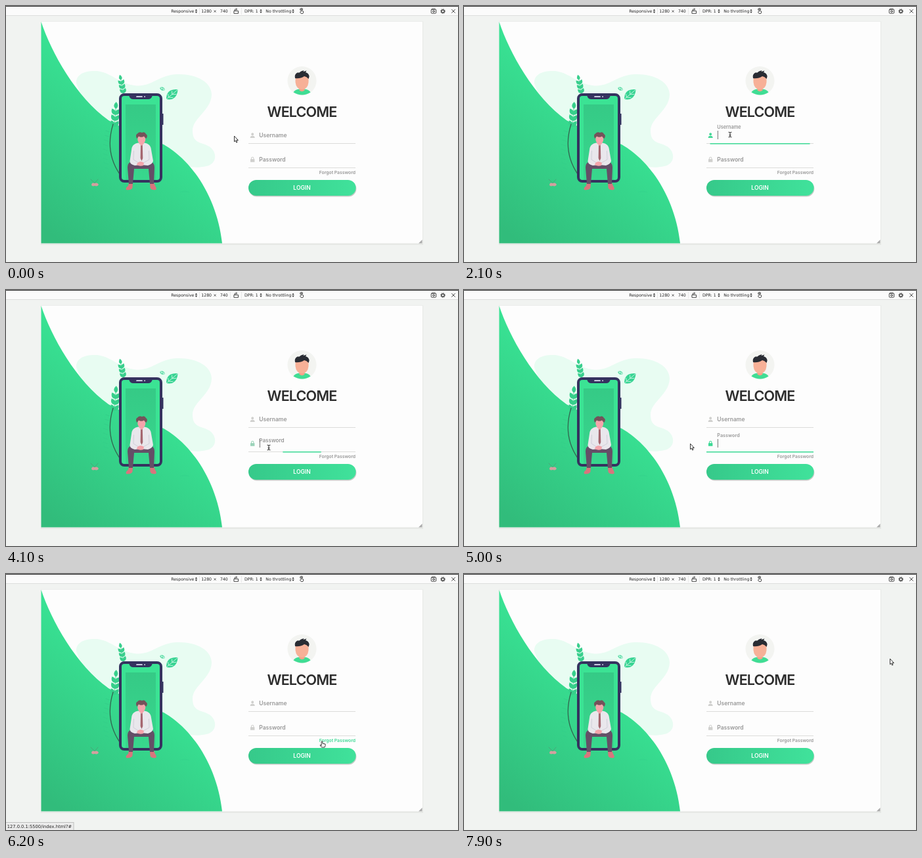
An HTML page for the animation above (8 s loop, 688x390 px).

```html
<!DOCTYPE html>
<html lang="en">
<head>
<meta charset="utf-8">
<title>Login form</title>
<style>
html, body { margin: 0; width: 688px; height: 390px; overflow: hidden; background: #f1f3f1; }
svg { display: block; }
text { font: 600 8.5px Inter, "Open Sans", sans-serif; }
.ui text { font: 6.2px "DejaVu Sans", Verdana, sans-serif; fill: #222; }
.line { fill: none; stroke-linecap: round; stroke-linejoin: round; }
</style>
</head>
<body>
<svg id="stage" width="688" height="390" viewBox="0 0 688 390">
  <defs>
    <linearGradient id="wave" x1=".62" y1=".22" x2=".12" y2="1">
      <stop stop-color="#3aeb99"/><stop offset="1" stop-color="#31bc7b"/>
    </linearGradient>
    <linearGradient id="btn" gradientUnits="userSpaceOnUse" x1="369" x2="697">
      <stop stop-color="#36c98a"/><stop offset=".5" stop-color="#40e29b"/><stop offset="1" stop-color="#36c98a"/>
    </linearGradient>
    <linearGradient id="screen" x2="0" y2="1">
      <stop stop-color="#35ca86"/><stop offset="1" stop-color="#38d78d"/>
    </linearGradient>
  </defs>

  <rect width="688" height="390" fill="#f1f3f1"/>
  <g class="ui">
    <rect width="688" height="14.5" fill="#fbfbfb"/>
    <rect width="688" height="1" fill="#333"/>
    <rect y="14" width="688" height="1" fill="#dddedd"/>
    <path d="M294.5 2V13M341.5 2V13M358.5 2V13" stroke="#e9e9e9"/>
    <text x="251.3" y="10.3">Responsive</text>
    <text x="297.3" y="10.3">1280</text>
    <text x="315.6" y="10.3">×</text>
    <text x="326" y="10.3">740</text>
    <text x="363" y="10.3">DPR: 1</text>
    <text x="395.3" y="10.3">No throttling</text>
    <path id="sorts" fill="#333"/>
    <g class="line" stroke="#333" stroke-width=".9">
      <path d="M347.3 7.5H353.5V11.3H347.3ZM348.4 7.3V5H351.5M350.6 4L351.7 5L350.6 6"/>
      <path d="M449 8.5V5Q449.7 4.2 450.3 5V7.2L452.6 8V10L451.8 11.5H449.2L447.4 9.2L448.2 8.6M447.7 6Q447 3.6 449.6 3.3Q452 3.4 451.6 5.5"/>
      <rect x="647.2" y="5" width="7.4" height="6.2" rx="1"/>
      <path d="M649 5V4.500H653V5"/>
      <circle cx="650.9" cy="8.100" r="1.400"/>
      <circle cx="665" cy="8" r="2.2" stroke-width="1.3"/>
      <circle cx="665" cy="8" r="3.4" stroke-dasharray="1.2 1.47" stroke-linecap="butt"/>
      <path d="M678.5 5.4L683.5 10.4M683.5 5.4L678.5 10.4"/>
    </g>
  </g>

  <rect x="53" y="23.5" width="582" height="340.5" fill="#e6e8e5"/>
  <rect x="53.5" y="24" width="580.5" height="337.5" fill="#fdfdfd"/>
  <path d="M628 361.5L633.5 356V361.5Z" fill="#aaa"/>
  <path fill="#e8fcf2" d="M107 118C106 104 120 98 138 99C160 101 172 118 195 121C220 125 232 105 260 104C290 103 313 116 313 135C312 160 284 170 284 190C284 212 300 206 312 216C322 225 320 241 305 244C280 250 256 240 235 225L120 150Z"/>
  <path fill="url(#wave)" d="M53.5 24C69 71 107 139 156 174C180 188 208 199 240 211C286 237 322 296 329 361.5H53.5Z"/>

  <g id="plants"></g>
  <g id="phone">
    <rect x="174" y="135" width="62" height="132" rx="6" fill="#3be394" stroke="#35325f" stroke-width="4"/>
    <rect x="182" y="150" width="46" height="115" fill="url(#screen)"/>
    <path fill="#35325f" d="M187 135H223Q222 142 217 142H193Q188 142 187 135ZM237 164H239.5V181H237Z"/>
    <path class="line" d="M199 138.2H207M211 138.2H211.2" stroke="#dfe0f2" stroke-width="1.7"/>
  </g>
  <g id="man">
    <path fill="#d9757d" d="M187 269H193L192.5 277Q190 281 183 280Q181.5 277 186 274ZM219 269H225L227 274Q230 278 228 280Q221 281 219.5 277Z"/>
    <path fill="#644f67" d="M189 238H222Q226 240 226 246L225 271H219L217 248H195L193 271H187L185 246Q185 240 189 238Z"/>
    <path fill="#e9e7ec" d="M201 208.5H211Q219 210 220.500 216L224 236Q223 241 216 243L206 242L196 243Q188 241 188.500 236L191.500 216Q193 210 201 208.5Z"/>
    <path class="line" d="M194.5 221L194 234L202 239M217.5 221L218 234L209 239" stroke="#cbc8d3" stroke-width=".8"/>
    <path fill="#a5666f" d="M205 211H207.800L208.300 232L206.500 236L204.600 232Z"/>
    <path fill="#f4a4ab" d="M202.5 203H210V209.5L206.3 213L202.5 209.5ZM200 239Q205 235 210 239L209 243Q204 245 199 242Z"/>
    <ellipse cx="206.300" cy="203" rx="6" ry="7" fill="#f4a4ab"/>
    <path fill="#74525a" d="M199 202Q196.500 196 200 194.500Q203 191 207 193Q211 191 213 195Q216.500 197 213.500 202Q211.500 200.500 210 198.500Q206 201 202 198.500Z"/>
  </g>

  <g id="avatar">
    <circle cx="450.5" cy="114" r="22" fill="#f3f4f1"/>
    <path fill="#40dd94" d="M437.5 131.500Q440 127 447 126.500H454Q461 127 463.500 131.500Q451 139.500 437.500 131.500Z"/>
    <path fill="#f2a288" d="M446.5 122H454.5V128.5Q450.5 132 446.5 128.5Z"/>
    <path fill="#f7b097" d="M440.5 107H460.5V116Q459.5 126.5 450.5 127.5Q441.5 126.5 440.5 116Z"/>
    <path fill="#292c33" d="M440 110Q438.500 104 443.500 101.500L446.500 101.500L449 99.500L453.500 98L452.500 100L457.500 98.500L456 101Q461.500 102.500 461.500 108L460.500 111Q457.500 107.500 454 107Q448 111 440 110Z"/>
  </g>
  <text x="450.5" y="169.3" text-anchor="middle" fill="#2d2d2d" style="font-size:21.5px;letter-spacing:-.85px">WELCOME</text>
  <g id="fields"></g>
  <text id="link" x="532" y="255.8" text-anchor="end" style="font-size:6.8px">Forgot Password</text>
  <rect x="369.8" y="266.5" width="163.5" height="24" rx="12" fill="#c3cbc6"/>
  <rect x="369" y="265" width="163.5" height="24" rx="12" fill="url(#btn)"/>
  <text x="450.5" y="280" text-anchor="middle" fill="#fff">LOGIN</text>

  <g id="status" class="ui">
    <rect x="-.5" y="378.5" width="103.5" height="12" fill="#ececec" stroke="#bfc0bf"/>
    <text x="1.8" y="387" style="font-size:6.7px">127.0.0.1:5500/index.html?#</text>
  </g>
  <g id="cursor" class="line">
    <path id="arrow" d="M.5 .5V8.700L2.300 7.100L3.700 10L5 9.400L3.700 6.500H6Z" fill="#fff" stroke="#222" stroke-width=".9"/>
    <path id="beam" d="M-2 -3.8Q0 -3.8 0 -3V3Q0 3.8 -2 3.8M2 -3.8Q0 -3.8 0 -3M0 3Q0 3.8 2 3.8M-1 .8H1" stroke="#222" stroke-width="1"/>
    <path id="hand" d="M-.9 4V.3Q0 -.8 .9 .3V3.2L5 4V6.5L4 9H-.5L-3 5.8Q-2.5 4.6 -.9 6Z" fill="#fff" stroke="#222" stroke-width=".9"/>
  </g>
</svg>
<script>
const $ = id => document.getElementById(id);
const mix = (a, b, k) => a + (b - a) * k;
const blend = (a, b, k) => `rgb(${a.map((v, i) => Math.round(mix(v, b[i], k)))})`;
const GREEN = [59, 217, 148];

$("sorts").setAttribute("d", [289.5, 388, 437]
  .map(x => `M${x - 1.7} 7.2L${x} 4.8L${x + 1.7} 7.2ZM${x - 1.7} 8.6L${x} 11L${x + 1.7} 8.6Z`).join(""));

// Foliage
const leaf = (x, y, angle, len, fill, vein = "") =>
  `<g transform="translate(${x} ${y}) rotate(${angle})">
    <path d="M0 0Q${len * .45} ${-len * .55} ${len} 0Q${len * .45} ${len * .55} 0 0" fill="${fill}"/>
    ${vein && `<path d="M0 0H${len}M${len * .3} ${-len * .18}L${len * .2} 0L${len * .4} ${len * .2}M${len * .62} ${-len * .16}L${len * .5} 0L${len * .7} ${len * .16}" class="line" stroke="${vein}" stroke-width=".7"/>`}
  </g>`;
const sprig = (x0, y0, x1, y1, n, size, fill) => {
  const dir = Math.atan2(y1 - y0, x1 - x0) * 180 / Math.PI;
  let out = `<path d="M${x0} ${y0}L${x1} ${y1}" stroke="${fill}" stroke-width=".8"/>` + leaf(x1, y1, dir, size, fill);
  for (let i = 0; i < n; i++) {
    const x = mix(x0, x1, i / n), y = mix(y0, y1, i / n);
    out += leaf(x, y, dir - 32, size, fill) + leaf(x, y, dir + 32, size, fill);
  }
  return out;
};
let fern = "";
for (let i = 0; i < 9; i++) fern += `M${158 - 4 * Math.sin(i / 3)} ${192 + i * 7}l-6 -2`;
$("plants").innerHTML =
  sprig(179, 133, 175, 113, 3, 8.5, "#39cf8d") +
  sprig(165, 184, 167, 157, 3, 11, "#36cf8b") +
  `<path d="${fern}" class="line" stroke="#35cf89" stroke-width="1.2"/>
   <path d="M163 180Q150 222 173 256" class="line" stroke="#31664f" stroke-width="1.3"/>` +
  leaf(244, 142, -40, 23, "#38d493", "#e8fcf2") +
  leaf(242, 128, 205, 9, "#38d493", "#e8fcf2") +
  `<path d="M135 270L129 264M135 270L140 264" class="line" stroke="#4e9c74" stroke-width=".8"/>
   <path d="M130 272Q131 268.5 135 270Q139 268.5 141 272Q140 275.5 135 274Q130 275.5 130 272" fill="#d3a09f"/>
   <path d="M264 284Q271 279 280 284Z" fill="#35d58c"/>`;

// Input fields: y is the middle of the row
const person = "M375.2 193.3a2 2 0 1 1 -.01 0ZM371.7 201Q371.7 197.8 375.2 197.8Q378.7 197.8 378.7 201Z";
const lock = "M372 233.2H373V232Q373 229.8 375.2 229.8Q377.4 229.8 377.4 232V233.2H378.4V237.8H372ZM374 233.2H376.4V232Q376.4 230.8 375.2 230.8Q374 230.8 374 232Z";
const fields = [
  { name: "Username", y: 196.5, icon: person, focus: 1800, blur: 3000 },
  { name: "Password", y: 233.5, icon: lock, focus: 4000, blur: 5200 }
];
for (const f of fields) {
  const g = document.createElementNS("http://www.w3.org/2000/svg", "g");
  g.innerHTML = `<path d="${f.icon}" fill-rule="evenodd"/>
    <rect x="369" y="${f.y + 12.5}" width="163" height="1" fill="#dcdcda"/>
    <rect y="${f.y + 12.5}" height="1.5" fill="#3bd994"/>
    <text x="385.3" fill="#989898">${f.name}</text>
    <rect x="385.9" y="${f.y - 6.5}" width=".9" height="13" fill="#666"/>`;
  $("fields").append(g);
  [f.iconEl, , f.bar, f.label, f.caret] = g.children;
}

// CSS "ease" curve
function ease(p) {
  if (p <= 0 || p >= 1) return p <= 0 ? 0 : 1;
  const curve = (s, a, b) => 3 * s * (1 - s) ** 2 * a + 3 * s * s * (1 - s) * b + s ** 3;
  let lo = 0, hi = 1;
  for (let i = 0; i < 20; i++) {
    const s = (lo + hi) / 2;
    if (curve(s, .25, .25) < p) lo = s; else hi = s;
  }
  return curve(lo, .1, 1);
}
const active = (t, from, to, dur) => ease((t - from) / dur) - ease((t - to) / dur);

// Pointer stops: time, x, y
const track = [
  [0, 347, 198], [1000, 347, 198], [1200, 349, 198], [1700, 405, 196], [2100, 405, 196],
  [2700, 362.5, 190.5], [2900, 362.5, 190.5], [3300, 355, 200], [3900, 400, 240], [4200, 400, 240],
  [4800, 344, 234], [5300, 344, 234], [5900, 481, 255], [6300, 481, 255], [6700, 440, 276],
  [7200, 520, 277], [7800, 648, 129], [8000, 648, 129]
];
function pointer(t) {
  const i = track.findIndex(k => k[0] > t);
  const [t0, x0, y0] = track[i - 1], [t1, x1, y1] = track[i];
  const p = (t - t0) / (t1 - t0), k = p * p * (3 - 2 * p);
  return [mix(x0, x1, k), mix(y0, y1, k)];
}

function draw(t) {
  for (const f of fields) {
    const k = active(t, f.focus, f.blur, 440), focused = t >= f.focus && t < f.blur;
    f.iconEl.setAttribute("fill", blend([208, 208, 206], GREEN, k));
    f.bar.setAttribute("x", 450.5 - 81.5 * k);
    f.bar.setAttribute("width", 163 * k);
    f.label.setAttribute("y", f.y + mix(3, -10, k));
    f.label.style.fontSize = mix(8.5, 7.25, k) + "px";
    f.caret.style.display = focused && (t - f.focus) % 1000 < 500 ? "" : "none";
  }
  $("link").setAttribute("fill", blend([150, 150, 150], GREEN, active(t, 5900, 6400, 300)));
  $("btn").setAttribute("gradientTransform", `translate(${-164 * active(t, 6500, 7300, 500)})`);
  $("status").style.display = t >= 5900 && t < 6400 ? "" : "none";

  const [x, y] = pointer(t);
  const inside = (x0, y0, x1, y1) => x >= x0 && x <= x1 && y >= y0 && y <= y1;
  const kind = inside(369, 265, 532, 289) || inside(477, 249, 532, 257) ? "hand"
    : inside(383, 183, 532, 210) || inside(383, 220, 532, 247) ? "beam" : "arrow";
  for (const id of ["arrow", "beam", "hand"]) $(id).style.display = id === kind ? "" : "none";
  $("cursor").setAttribute("transform", `translate(${x} ${y})`);
}

const start = performance.now();
function tick() {
  draw(Math.floor((performance.now() - start) % 8000 / 100) * 100);
  requestAnimationFrame(tick);
}
tick();
</script>
</body>
</html>
```
